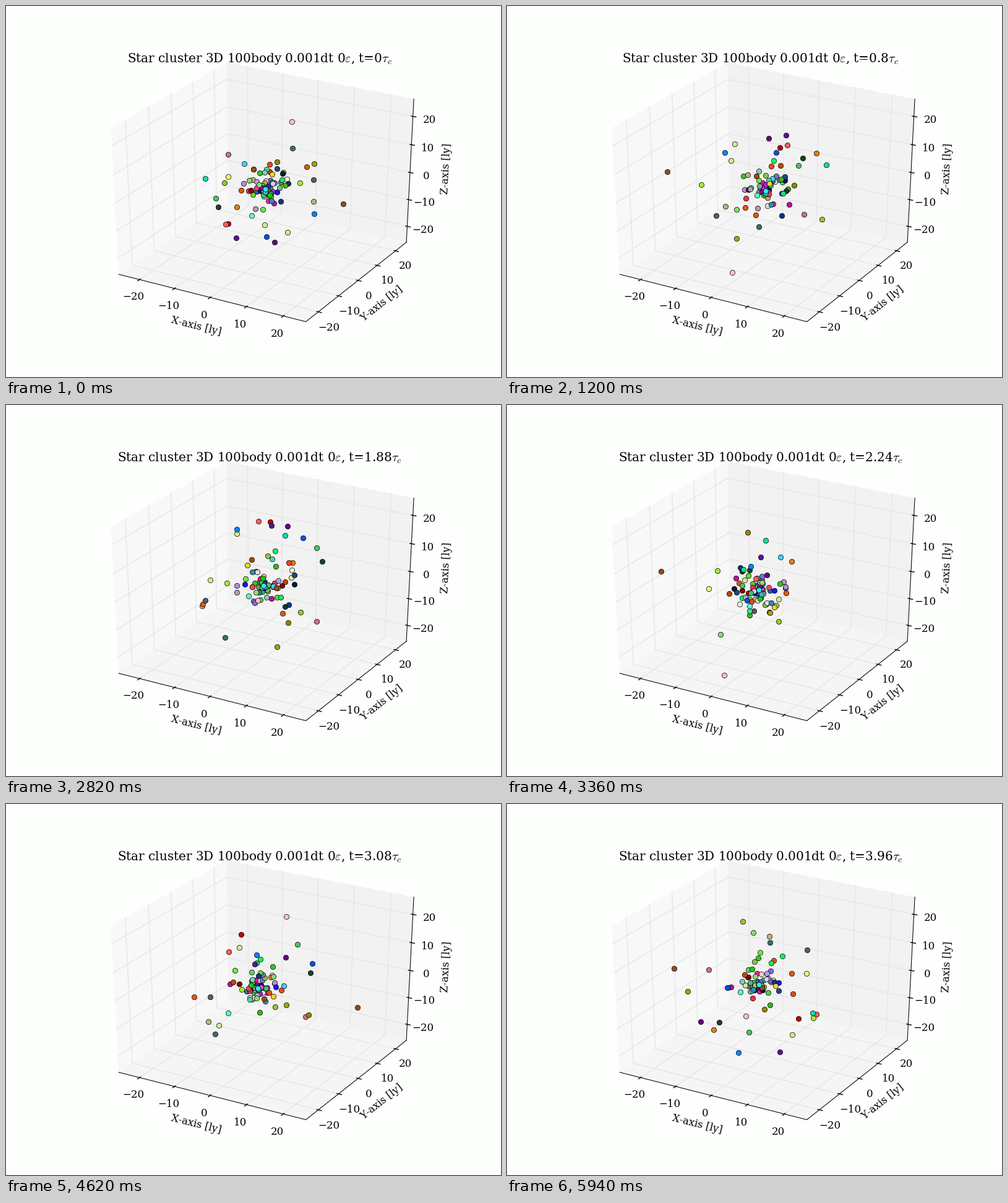
Recreate the animation shown at these times as a matplotlib script. Size 800 by 600 pixels, loop 6000 ms.

```python
import numpy as np
import matplotlib.pyplot as plt
from matplotlib.animation import FuncAnimation

plt.rcParams.update({
    "font.family": "DejaVu Serif",
    "mathtext.fontset": "cm",
    "font.size": 12,
    "text.kerning_factor": 6,
    "toolbar": "None",
})

W, H, DPI = 800, 600, 100
FRAMES, INTERVAL = 100, 60
STEP = 0.04                 # time per frame, in units of tau
BODIES = 100
LIMIT = 25                  # data range of every axis is +-LIMIT
DELTA = 1 / 12              # spacing unit for ticks and labels
EDGE = 0.5 + DELTA / 4      # half size of the drawn box

fig = plt.figure(figsize=(W / DPI, H / DPI), dpi=DPI, facecolor="#fdfffd")
ax = fig.add_axes([0, 0, 1, 1])
ax.set_xlim(0, W)
ax.set_ylim(H, 0)
ax.axis("off")


# --- perspective box, seen from azimuth -60 and elevation 30 ---

def project(p):
    """Box coordinates (data range is -0.5 to 0.5) to stage pixels."""
    x, y, z = p
    c, s = np.cos(np.pi / 6), 0.5
    right = c * x + s * y
    up = -s * s * x + s * c * y + c * z
    depth = 10 - (c * s * x - c * c * y + s * z)
    scale_x, scale_y = 620 / 0.185, 480 / 0.185
    return (100 + scale_x * (0.095 + right / depth),
            540 - scale_y * (0.095 + up / depth))


def line(*corners, **style):
    ax.plot(*zip(*map(project, corners)), **style)


def pane(axis, side, gray):
    corners = []
    for a, b in ((-1, -1), (1, -1), (1, 1), (-1, 1)):
        corners.append(np.insert([a * EDGE, b * EDGE], axis, side * EDGE))
    ax.fill(*zip(*map(project, corners)),
            color=str(gray), alpha=0.5, lw=0, zorder=1)


def draw_axis(axis, name, corner, tick_axis):
    """Axis line, ticks, tick labels, grid and title along one box edge."""
    corner = np.array(corner, float)
    start, end = corner * EDGE, corner * EDGE
    start[axis], end[axis] = -EDGE, EDGE
    line(start, end, color="black", lw=0.75, zorder=3)

    inward = np.zeros(3)
    inward[tick_axis] = -corner[tick_axis] * DELTA
    # grid runs over the two back panes, through the corner they share
    back = np.array([-1, 1, -1]) * EDGE
    others = [i for i in range(3) if i != axis]

    for value in range(-20, 21, 10):
        at = corner * EDGE
        at[axis] = value / LIMIT / 2
        line(at - 0.2 * inward, at + 0.1 * inward,
             color="black", lw=1, zorder=3)
        label = str(value).replace("-", "\u2212")
        ax.text(*project(at + 0.7 * DELTA * corner), label,
                ha="center", va="top")

        mid = back.copy()
        mid[axis] = at[axis]
        ends = [mid.copy(), mid.copy()]
        for point, i in zip(ends, others):
            point[i] = -back[i]
        line(ends[0], mid, ends[1], color="0.9", lw=1, zorder=2)

    (x0, y0), (x1, y1) = project(start), project(end)
    ax.text(*project(corner * (EDGE + 1.6 * DELTA)), f"{name}-axis [ly]",
            rotation=np.degrees(np.arctan2(y0 - y1, x1 - x0)),
            ha="center", va="center")


pane(0, -1, 0.95)
pane(1, 1, 0.90)
pane(2, -1, 0.925)
draw_axis(0, "X", (0, -1, -1), 1)
draw_axis(1, "Y", (1, 0, -1), 0)
draw_axis(2, "Z", (1, 1, 0), 0)


# --- stars swing through the cluster centre while their orbits turn ---

tau = STEP * np.arange(FRAMES)
hub = np.column_stack([413 + 6 * np.cos(2 * np.pi * tau / 0.88),
                       296 + 4 * np.sin(2 * np.pi * tau / 0.7)])


def swing(reach, angle, spin, phase=0.0, tilt=0.0):
    """Path of one star; reach in pixels, angle and spin in degrees."""
    period = 1.3 * (reach / 110) ** 0.4
    swell = reach * (1 - 0.22 * np.exp(-4 * tau))
    turn = np.radians(angle + spin * tau)
    t = 2 * np.pi * tau / period + phase
    along, across = swell * np.cos(t), tilt * swell * np.sin(t)
    return hub + np.column_stack(
        [along * np.cos(turn) - across * np.sin(turn),
         along * np.sin(turn) + across * np.cos(turn)])


# colour, reach, angle, spin of the stars that travel farthest
WIDE = [
    ("#984a18", 165, 11, 0),
    ("#0c84f8", 115, 27, 20),
    ("#680080", 112, 80, 17),
    ("#581498", 118, 120, -12),
    ("#fc5c64", 110, 138, -28),
    ("#fcc0c4", 150, -68, 0),
    ("#9ca410", 115, -27, -40),
    ("#10dcb0", 125, 190, -41),
    ("#0850e4", 100, 88, 22),
]

rng = np.random.default_rng(12)
paths, colors = [], []
for _ in range(BODIES - len(WIDE) - 1):
    paths.append(swing(reach=np.clip(rng.exponential(38), 6, 105),
                       angle=rng.uniform(0, 360),
                       spin=rng.normal(0, 25),
                       phase=rng.normal(0, 0.5),
                       tilt=rng.uniform(-0.4, 0.4)))
    colors.append(tuple(rng.uniform(0, 1, 3)))
for color, reach, angle, spin in WIDE:
    paths.append(swing(reach, angle, spin))
    colors.append(color)
paths.append(hub)
colors.append("#30e8f4")

# markers sit on whole pixels
track = np.floor(np.stack(paths, axis=1)) + 0.5

dots = ax.scatter(track[0, :, 0], track[0, :, 1], s=36, c=colors,
                  edgecolors="black", linewidths=0.5, zorder=5)
title = ax.text(410, 91, "", fontsize=14.4, ha="center", va="baseline")


def update(i):
    dots.set_offsets(track[i])
    title.set_text("Star cluster 3D 100body 0.001dt "
                   rf"0$\varepsilon$, t={STEP * i:g}$\tau_c$")
    return dots, title


anim = FuncAnimation(fig, update, frames=FRAMES, interval=INTERVAL,
                     repeat=True, repeat_delay=0, blit=False)
plt.show()
```
